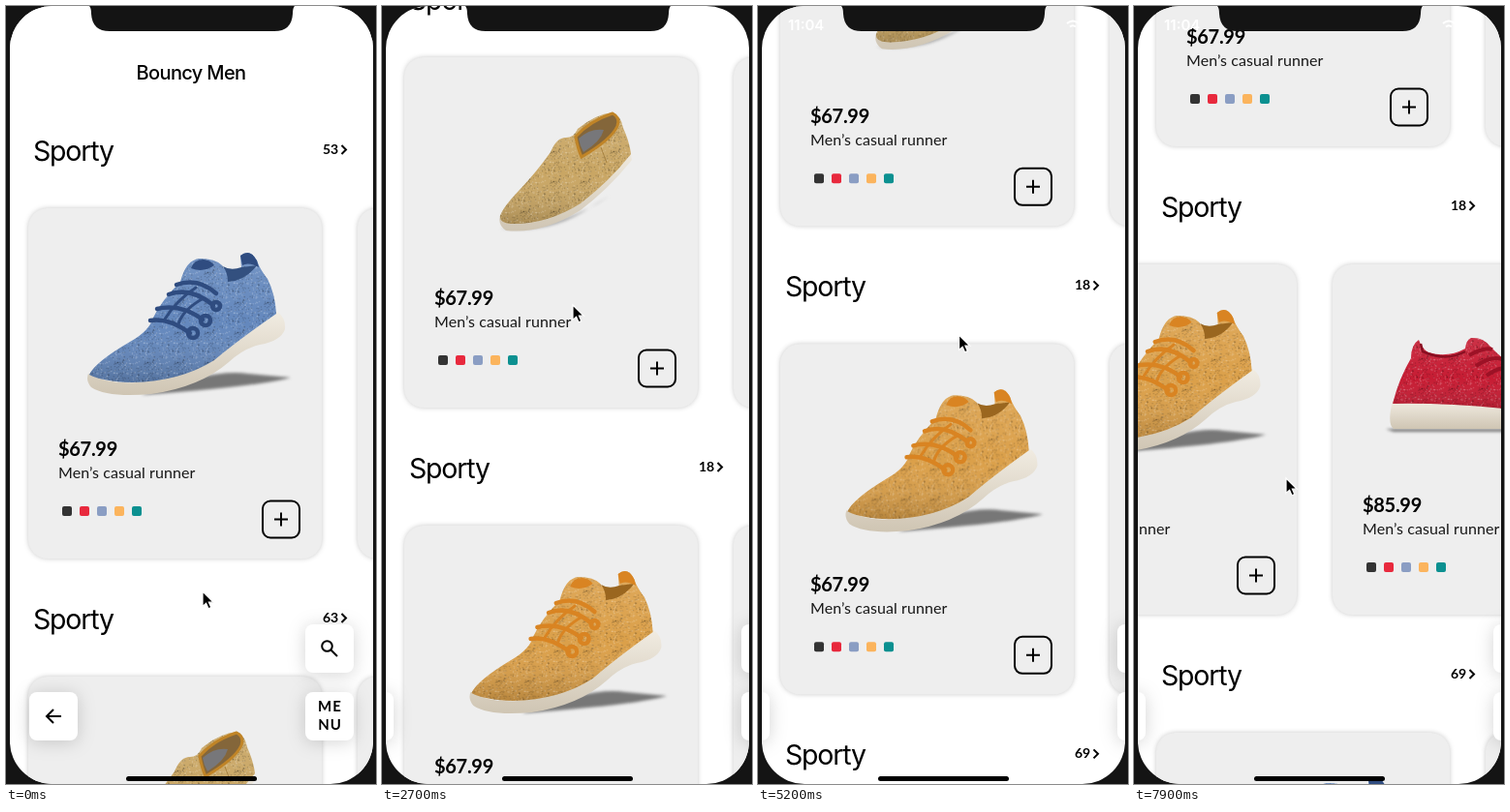
Recreate the animation shown at these times as an HTML page. Size 382 by 804 pixels, loop 8 s.

```html
<!DOCTYPE html>
<html lang="en">
<head>
<meta charset="utf-8">
<title>Shoe shop</title>
<style>
html, body { margin: 0; width: 100%; height: 100%; overflow: hidden; background: #141414; }
svg { display: block; width: 100vw; height: 100vh; font-family: Lato, sans-serif; }
.title { font: 400 28.5px Inter, sans-serif; letter-spacing: -1.2px; }
.head { font: 500 20px Inter, sans-serif; letter-spacing: -.65px; text-anchor: middle; }
.clock { font: 600 15px Inter, sans-serif; fill: #fff; }
.price { font-weight: 700; font-size: 20px; letter-spacing: -.3px; }
.name { font-size: 16px; letter-spacing: .08px; fill: #181818; }
.count { font-weight: 700; font-size: 14px; }
.menu { font-weight: 700; font-size: 15px; letter-spacing: 1px; text-anchor: middle; }
.card { fill: #eee; filter: drop-shadow(0 0 2.5px rgba(0,0,0,.22)); }
.fab { fill: #fff; filter: drop-shadow(0 2px 9px rgba(0,0,0,.17)); }
.line { fill: none; stroke: #000; stroke-width: 2; }
.soft { filter: blur(1.8px); }
</style>
</head>
<body>
<svg viewBox="0 0 382 804" preserveAspectRatio="none">
  <defs>
    <clipPath id="screen"><rect x="4" y="0" width="375" height="804" rx="44"/></clipPath>
    <linearGradient id="fade" x2="0" y2="1">
      <stop stop-color="#000" stop-opacity=".3"/>
      <stop offset="1" stop-color="#000" stop-opacity="0"/>
    </linearGradient>
    <linearGradient id="shade" x2="0" y2="1">
      <stop stop-color="#fff" stop-opacity=".1"/>
      <stop offset=".55" stop-color="#fff" stop-opacity="0"/>
      <stop offset="1" stop-color="#000" stop-opacity=".16"/>
    </linearGradient>
    <linearGradient id="rubber" x2="0" y2="1">
      <stop stop-color="#f1ece2"/><stop offset="1" stop-color="#cfc5b3"/>
    </linearGradient>
    <pattern id="weave" width="31" height="31" patternUnits="userSpaceOnUse"></pattern>
  </defs>
  <g clip-path="url(#screen)">
    <rect width="382" height="804" fill="#fff"/>
    <g id="list"></g>
    <g id="header">
      <rect width="382" height="97" fill="#fff"/>
      <rect id="headShade" y="97" width="382" height="13" fill="url(#fade)"/>
      <text class="head" x="191" y="76">Bouncy Men</text>
    </g>
    <g id="left">
      <rect class="fab" x="24" y="709" width="50" height="50" rx="8"/>
      <path class="line" d="M57 734H42M49 727l-7 7 7 7"/>
    </g>
    <g id="right">
      <rect class="fab" x="309" y="639" width="50" height="50" rx="8"/>
      <circle class="line" cx="331.500" cy="661.500" r="5.300"/>
      <path class="line" d="M335.500 665.500l6.500 6.500" stroke-width="2.500"/>
      <rect class="fab" x="309" y="709" width="50" height="50" rx="8"/>
      <text class="menu" x="334.500" y="729">ME</text>
      <text class="menu" x="334.500" y="748">NU</text>
    </g>
    <text class="clock" x="31" y="25">11:04</text>
    <g fill="none" stroke="#fff" stroke-width="2">
      <path d="M319 18q6-5 12 0M322 21.500q3-2.500 6 0"/>
      <rect x="338" y="15" width="20" height="9" rx="3"/>
    </g>
    <path d="M86 0H298Q296 2 296 8Q295 26 277 26H107Q89 26 88 8Q88 2 86 0Z" fill="#141414"/>
    <rect x="124" y="796" width="135" height="5" rx="2.500"/>
  </g>
  <path id="cursor" d="M0 0V15.500L3.600 12.200 6 17.800 8.800 16.600 6.400 11.200H11.300Z" stroke="#fff" stroke-width="1.200"/>
</svg>
<script>
const $ = id => document.getElementById(id);
const LOOP = 8000, STEP = 100, SECTION = 484, CARD = 340;

// Speckled cloth
let seed = 7;
const rnd = () => (seed = seed * 16807 % 2147483647) / 2147483647;
$('weave').innerHTML = Array.from({ length: 170 }, (_, i) =>
  `<circle cx="${rnd() * 31}" cy="${rnd() * 31}" r=".75" fill="${i % 2 ? '#fff' : '#000'}" opacity=".17"/>`).join('');

const cloth = (d, color) => [color, 'url(#shade)', 'url(#weave)']
  .map(fill => `<path d="${d}" fill="${fill}"/>`).join('');

const runner = (color, dark, tab, fit = '') => `<g transform="${fit}">
  <path class="soft" d="M140 402Q215 374 250 380L294 384Q262 393 140 402Z" fill="#777"/>
  <path d="M85 380Q105 391 135 389Q180 386 213 366Q245 338 280 316Q289 322 288 334Q284 346 262 350Q245 354 230 368Q200 394 150 401Q105 405 88 394Q82 387 85 380Z" fill="url(#rubber)"/>
  ${cloth('M86 381Q92 368 128 347Q148 336 152 322Q160 305 180 285Q186 262 200 261Q216 261 223 268Q228 277 243 271L242 258Q252 250 259 263Q262 272 270 282Q278 298 279 318Q240 345 215 366Q180 388 130 389Q100 388 86 381Z', color)}
  <path d="M224 269Q232 274 243 270L259 268Q247 284 229 285Q229 276 224 269Z" fill="${dark}"/>
  <path d="M242 258Q252 250 259 263L261 270Q250 264 244 268Z" fill="${tab}"/>
  <path d="M191 271Q194 262 204 262Q212 263 215 268Q204 276 191 271Z" fill="${tab}"/>
  <g fill="none" stroke="${tab}" stroke-width="4.500" stroke-linecap="round">
    <path d="M149 325Q168 322 190 338M156 313Q180 307 203 324M168 298Q190 290 214 309M176 288Q198 280 217 297"/>
    <path d="M163 325Q176 304 196 291M178 329Q182 314 204 302" stroke-width="3"/>
    <circle cx="193" cy="338" r="5"/><circle cx="206" cy="325" r="5"/><circle cx="217" cy="310" r="4"/>
  </g></g>`;

const loafer = () => `
  <path class="soft" d="M122 386Q175 392 215 364L235 352Q190 384 122 386Z" fill="#aaa"/>
  <path d="M122 372Q119 382 128 388Q165 392 205 367Q235 344 258 315L256 303Z" fill="url(#rubber)"/>
  ${cloth('M122 373Q124 365 142 346Q160 327 174 307Q180 292 190 292Q198 292 202 283Q220 268 238 266Q246 268 249 282Q256 298 257 309Q235 337 205 360Q170 382 133 381Q121 380 122 373Z', '#c9a664')}
  <path d="M200 291Q214 275 238 267Q246 271 243 280Q237 294 206 312Q202 303 200 291Z" fill="#84663a" stroke="#c08427" stroke-width="3"/>
  <path d="M203 293Q215 282 229 284Q226 296 208 307Q204 300 203 293Z" fill="#77777a"/>
  <path d="M226 302L232 318" stroke="#a6813f"/>`;

const sidewalk = () => `
  <path class="soft" d="M78 379H300L290 382H86Z" fill="#777"/>
  <path d="M85 350Q79 374 86 379H288Q303 376 300 360Z" fill="url(#rubber)"/>
  ${cloth('M85 353Q92 326 104 306Q104 292 112 287Q115 296 122 300Q142 306 160 296Q161 287 166 285Q178 284 185 293Q214 323 246 336Q291 340 300 362Q250 363 200 358Q140 352 85 353Z', '#c61c33')}
  <path d="M114 291L116 299Q140 310 160 299" fill="none" stroke="#8a0f22" stroke-width="2.500"/>
  <path d="M164 303Q180 294 188 297M171 314Q187 303 198 307M182 324Q197 313 210 317" fill="none" stroke="#9c1226" stroke-width="4"/>`;

const blue = () => runner('#6488bd', '#33507f', '#2f4c80');
const orange = () => runner('#dba04a', '#9a661f', '#d98422', 'translate(9 1) scale(.97 1)');

const swatches = ['#333', '#e8293d', '#8a9dc3', '#fbb45d', '#0b9090'];
const card = (i, shoe, price) => `<g transform="translate(${i * CARD})">
  <rect class="card" x="23" y="209" width="303" height="362" rx="20"/>
  ${shoe ? shoe() : ''}
  <text class="price" x="54" y="465">${price}</text>
  <text class="name" x="54" y="488">Men’s casual runner</text>
  ${swatches.map((c, k) => `<rect x="${58 + k * 18}" y="517" width="10" height="10" rx="2" fill="${c}"/>`).join('')}
  <rect class="line" x="265" y="511.500" width="38" height="38" rx="8"/>
  <path class="line" d="M277 530.500h14M284 523.500v14"/></g>`;

const sections = [
  [53, [[blue, '$67.99'], [orange, '$67.99']]],
  [63, [[loafer, '$67.99'], [blue, '$67.99']]],
  [18, [[orange, '$67.99'], [loafer, '$45.89'], [orange, '$67.99'], [sidewalk, '$85.99']]],
  [69, [[blue, '$67.99'], [loafer, '$67.99']]],
];
$('list').innerHTML = sections.map(([count, cards], i) => `<g transform="translate(0 ${i * SECTION})">
  <text class="title" x="28" y="160">Sporty</text>
  <text class="count" x="327" y="153">${count}</text>
  <path class="line" d="M346.500 144l4.500 4.500-4.500 4.500" stroke-width="1.800"/>
  <g id="row${i}">${cards.map((c, k) => card(k, ...c)).join('')}</g></g>`).join('');

// Keys are [time, value, power]; a power above 1 slows the arrival
function track(keys, t) {
  const n = keys.findIndex(k => k[0] > t);
  if (n < 0) return keys[keys.length - 1][1];
  if (!n) return keys[0][1];
  const [t0, a] = keys[n - 1], [t1, b, power = 1] = keys[n];
  return a + (b - a) * (1 - (1 - (t - t0) / (t1 - t0)) ** power);
}
const smooth = (t, start, span) => {
  const p = Math.min(1, Math.max(0, (t - start) / span));
  return p * p * (3 - 2 * p);
};

const scrollKeys = [[0, 0], [500, 9.5, 2], [1520, 9.5], [2000, 308], [2700, 640, 2], [2900, 640],
  [3500, 501], [4000, 485, 2], [4150, 485], [4600, 626], [5900, 910, 2]];
const swipeKeys = [[5950, 0], [6300, 141], [6800, 340, 2], [6900, 340], [7150, 520],
  [7550, 680, 2], [7600, 680], [7900, 838]];
const cursorX = [[0, 203], [900, 203], [1000, 204], [1520, 204], [2000, 198], [2700, 197], [3500, 199],
  [4100, 199], [4200, 215], [4600, 224], [5000, 224], [5900, 150], [5950, 147], [6300, -14],
  [6650, -14], [6850, 340], [6900, 335], [7150, 155], [7550, 315], [7600, 315], [7900, 157]];
const cursorY = [[0, 605], [500, 606], [900, 606], [1000, 608], [1520, 608], [2000, 310], [2700, 309],
  [2900, 360], [3500, 502], [4100, 502], [4200, 466], [4600, 310], [5000, 300], [5900, 480], [7900, 488]];

function move(id, x, y) { $(id).setAttribute('transform', `translate(${x} ${y})`); }

function draw(now) {
  const t = Math.floor(now % LOOP / STEP) * STEP;
  const scroll = track(scrollKeys, t);
  const hidden = smooth(t, 1700, 380) - smooth(t, 2980, 380) + smooth(t, 4300, 380);
  move('list', 0, -scroll);
  move('row2', -track(swipeKeys, t), 0);
  move('header', 0, -125 * hidden);
  $('headShade').setAttribute('opacity', Math.min(1, Math.max(0, (scroll - 20) / 30)));
  move('left', -62 * hidden, 0);
  move('right', 62 * hidden, 0);
  move('cursor', track(cursorX, t), track(cursorY, t));
}
const start = performance.now();
function frame() {
  draw(performance.now() - start);
  requestAnimationFrame(frame);
}
frame();
</script>
</body>
</html>
```
